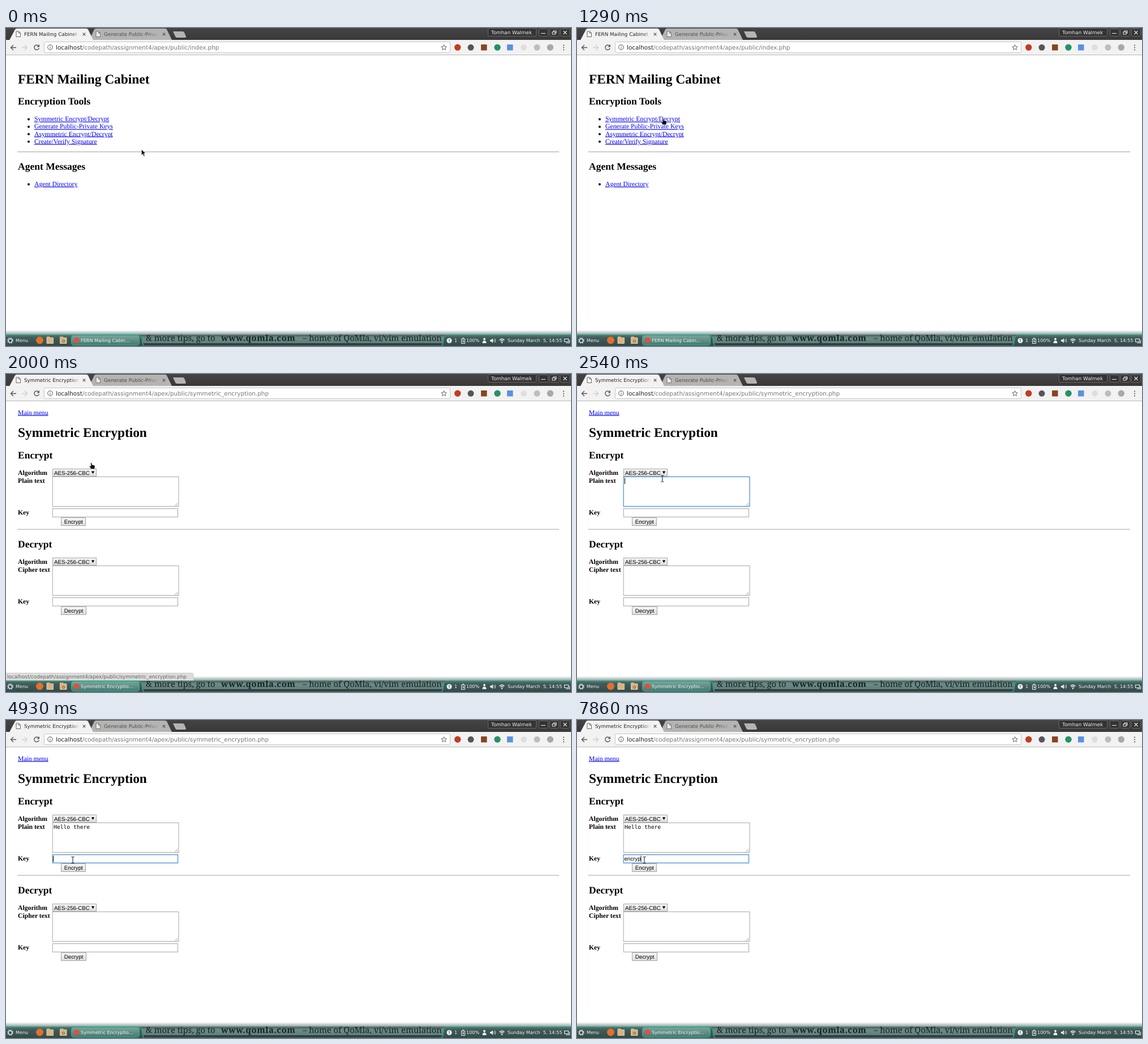
An HTML page that plays this animation: 998x561 px, repeating every 8 s.

```html
<!DOCTYPE html>
<html lang="en">
<head>
<meta charset="utf-8">
<title>Message tools</title>
<style>
html, body { margin: 0; width: 100%; height: 100%; overflow: hidden; background: #fff; }
svg { display: block; width: 100vw; height: 100vh; }
text { white-space: pre; text-rendering: geometricPrecision; }
.ui { font-family: "DejaVu Sans", sans-serif; font-size: 8.77px; fill: #222; }
.url { font-size: 10.41px; fill: #777; }
.panel { font-size: 8.1px; fill: #edf3f2; }
.page { font-family: "Liberation Serif", serif; font-size: 11.69px; }
.h1 { font-size: 23.38px; font-weight: bold; }
.h2 { font-size: 17.53px; font-weight: bold; }
.label { font-weight: bold; }
.link { fill: #00e; text-decoration: underline; }
.pressed .link:first-of-type { fill: #e00; }
.form { font-family: "Liberation Sans", Arial, sans-serif; font-size: 9.74px; }
.mono { font-family: "DejaVu Sans Mono", monospace; font-size: 9.7px; }
.wall { font-family: "Noto Serif", serif; font-size: 14.7px; fill: #14211f; }
.wall .site { font-weight: bold; letter-spacing: .6px; }
.field { fill: #fff; stroke: #a5a5a5; }
.field.on { stroke: #4b91dc; stroke-width: 1.3; }
.line { fill: none; stroke: #555; stroke-width: 1.4; }
.rule { stroke: #a2a2a2; }
</style>
</head>
<body>
<svg viewBox="0 0 998 561" preserveAspectRatio="none">
  <defs>
    <linearGradient id="title" x2="0" y2="1"><stop stop-color="#444"/><stop offset="1" stop-color="#383838"/></linearGradient>
    <linearGradient id="button" x2="0" y2="1"><stop stop-color="#f8f8f8"/><stop offset="1" stop-color="#dcdcdc"/></linearGradient>
    <linearGradient id="shade" x2="0" y2="1"><stop stop-color="#50706c" stop-opacity="0"/><stop offset="1" stop-color="#50706c" stop-opacity=".65"/></linearGradient>
    <linearGradient id="strip" x2="0" y2="1">
      <stop stop-color="#466460"/><stop offset=".3" stop-color="#6d8b87"/><stop offset=".7" stop-color="#617f7b"/><stop offset="1" stop-color="#35504c"/>
    </linearGradient>
    <linearGradient id="dock" x2="0" y2="1"><stop stop-color="#587572"/><stop offset=".25" stop-color="#405b59"/><stop offset="1" stop-color="#314a48"/></linearGradient>
    <linearGradient id="task" x2="0" y2="1"><stop stop-color="#7ba39b"/><stop offset="1" stop-color="#437a6e"/></linearGradient>
    <linearGradient id="fadeLight"><stop stop-color="#f2f2f2" stop-opacity="0"/><stop offset="1" stop-color="#f2f2f2"/></linearGradient>
    <linearGradient id="fadeGrey"><stop stop-color="#b4b4b3" stop-opacity="0"/><stop offset="1" stop-color="#b4b4b3"/></linearGradient>
    <clipPath id="clipTab"><rect x="30" width="99" height="22"/></clipPath>
    <clipPath id="clipOther"><rect x="170" width="99" height="22"/></clipPath>
    <clipPath id="clipStrip"><rect x="243" y="535" width="527" height="26"/></clipPath>
    <path id="sheet" d="M.5.5H5L8 3.500V10H.5ZM5 .5V3.500H8" fill="#fafafa" stroke="#555" stroke-width=".9"/>
    <path id="cross" d="M-2.300-2.300L2.300 2.300M2.300-2.300L-2.300 2.300" stroke="#555" stroke-width="1.200"/>
  </defs>

  <g id="home" class="page"></g>
  <g id="tool" class="page"></g>

  <g class="ui">
    <rect width="998" height="22" fill="url(#title)"/>
    <path d="M147 21L156 2.500Q157 1 159 1H281Q283 1 284 2.500L293 21Z" fill="#b4b4b3"/>
    <path d="M6 21.500L16 2.500Q17 1 19 1H142Q144 1 145 2.500L154 21.500Z" fill="#f2f2f2"/>
    <path d="M295 6H312Q314 6 315 8L318 15Q318 17 316 17H302Q300 17 299 15Z" fill="#b4b4b3"/>
    <use href="#sheet" x="17.500" y="5.500"/><use href="#sheet" x="158.500" y="5.500" opacity=".75"/>
    <text id="tabTitle" x="32" y="14" clip-path="url(#clipTab)"/>
    <rect x="115" y="4" width="15" height="14" fill="url(#fadeLight)"/>
    <text x="173" y="14" fill-opacity=".7" clip-path="url(#clipOther)">Generate Public-Private</text>
    <rect x="252" y="4" width="17" height="14" fill="url(#fadeGrey)"/>
    <use href="#cross" x="138" y="11"/><use href="#cross" x="279" y="11"/>
    <g fill="#333" stroke="#686868">
      <rect x="851.500" y=".5" width="85" height="14" rx="2"/>
      <rect x="941.500" y="1.500" width="16" height="13" rx="2"/><rect x="960.500" y="1.500" width="16" height="13" rx="2"/><rect x="979.500" y="1.500" width="16" height="13" rx="2"/>
    </g>
    <text x="893" y="11" text-anchor="middle" style="fill:#eee">Tomhan Walmek</text>
    <path d="M945 9.500H953M965 7H970V11H965ZM967 7V5H972V9H970M984.500 5L990.500 11M990.500 5L984.500 11" fill="none" stroke="#eee" stroke-width="1.100"/>

    <rect y="21" width="998" height="26.500" fill="#f2f2f2"/>
    <path d="M0 47.500H998" stroke="#b8b8b8"/>
    <rect x="67.500" y="24.500" width="717" height="19" rx="2" fill="#fff" stroke="#c6c6c6"/>
    <path class="line" d="M18 34.500H8.500M13 30L8.500 34.500L13 39"/>
    <path class="line" d="M28 34.500H37.500M33 30L37.500 34.500L33 39" opacity=".22"/>
    <path class="line" d="M57.500 31.500A4.300 4.300 0 1 0 58.300 35.500"/><path d="M59 29V33.500H54.500Z" fill="#555"/>
    <circle cx="78" cy="34" r="4.300" class="line" style="stroke-width:1"/><path d="M78 33.500V36.500M78 31.300V32.400" stroke="#555"/>
    <text class="url" x="88" y="38"><tspan fill="#222">localhost</tspan><tspan id="path"/></text>
    <path d="M773.500 29.500L774.800 32.700L778.300 33L775.600 35.200L776.500 38.600L773.500 36.700L770.500 38.600L771.400 35.200L768.700 33L772.200 32.700Z" class="line" style="stroke-width:.9"/>
    <circle cx="797.700" cy="34.300" r="5.700" fill="#c23b22"/>
    <circle cx="821" cy="34.300" r="5.500" fill="#55565a"/>
    <rect x="839" y="29" width="10.500" height="10.500" fill="#87451f"/>
    <circle cx="868" cy="34.300" r="5.700" fill="#249266"/>
    <rect x="885" y="29" width="10.500" height="10.500" fill="#5a91df"/>
    <circle cx="914.500" cy="34.300" r="5.300" fill="#dedede"/>
    <circle cx="938" cy="34.300" r="5.500" fill="#bdbdbd"/>
    <circle cx="961.300" cy="34.300" r="5.700" fill="#a8a8a8"/>
    <path d="M985 30.500h.01M985 34.500h.01M985 38.500h.01" stroke="#555" stroke-width="2.200" stroke-linecap="round"/>
  </g>

  <rect y="533" width="998" height="8" fill="url(#shade)"/>
  <g id="status" class="ui">
    <path d="M0 527.500H328Q331 527.500 331 530.500V541H0Z" fill="#dcdcdc" stroke="#c4c4c4" stroke-width=".7"/>
    <text x="2" y="537" style="fill:#68605a">localhost/codepath/assignment4/apex/public/symmetric_encryption.php</text>
  </g>

  <rect y="541" width="998" height="20" fill="url(#strip)"/>
  <g clip-path="url(#clipStrip)">
    <path d="M243 557.500H770" stroke="#0d1716" stroke-width="1.600"/>
    <g class="wall">
      <text x="247" y="552">&amp; more tips, go to</text>
      <text class="site" x="380" y="552">www.qomla.com</text>
      <text x="524" y="552">– home of QoMla, vi/vim emulation</text>
    </g>
  </g>
  <g fill="url(#dock)" stroke="#2c9c84" stroke-width="1.500">
    <path d="M-2 541.500H232Q240 542 240 550Q240 556 244 562H-2Z"/>
    <path d="M1000 541.500H780Q773 542 773 550Q773 556 769 562H1000Z"/>
  </g>
  <rect x="115.500" y="542.500" width="120" height="17" rx="4" fill="url(#task)" stroke="#38b598"/>
  <g class="ui panel">
    <circle cx="7.500" cy="551.500" r="3.200" fill="none" stroke="#edf3f2" stroke-width="1.300"/>
    <circle cx="7.500" cy="551.500" r="4.700" fill="none" stroke="#edf3f2" stroke-width="1.500" stroke-dasharray="1.600 2.090"/>
    <text x="17" y="554">Menu</text>
    <circle cx="59.500" cy="551" r="6.500" fill="#e2702b"/>
    <path id="folder" d="M72 546Q72 545 73 545H77L78.500 546.500H83.500V556.500H72Z" fill="#d9b381" stroke="#f2dfbd" stroke-width=".8"/>
    <use href="#folder" x="23.500"/><circle cx="101.500" cy="552.500" r="2" fill="none" stroke="#76512a"/>
    <circle cx="124.500" cy="551" r="5" fill="#dd5144"/>
    <text id="taskTitle" x="132" y="554"/>
    <circle cx="783" cy="551.500" r="4.500"/><path d="M783 548.800V552M783 553V554.200" stroke="#38524f" stroke-width="1.300"/>
    <text x="792" y="554">1</text>
    <path d="M804.500 548.500H810.500V556.500H804.500ZM806 547H809M808 550L806.500 552.500H809L807 555" fill="none" stroke="#edf3f2"/>
    <text x="813" y="554">100%</text>
    <circle cx="845" cy="548.800" r="2"/><path d="M841.500 556Q841.500 551.500 845 551.500T848.500 556Z"/>
    <path d="M855 550H857L860 547.500V555.500L857 553H855Z"/><path d="M861.500 549.500Q863 551.500 861.500 553.500M863.500 548Q866 551.500 863.500 555" fill="none" stroke="#edf3f2" stroke-width=".9"/>
    <path d="M871.500 550.500Q876 546.500 880.500 550.500M873.300 552.500Q876 550 878.700 552.500" fill="none" stroke="#edf3f2" stroke-width="1.200"/><circle cx="876" cy="554.800" r="1.300"/>
    <text x="886" y="554">Sunday March&#160; 5, 14:55</text>
    <path d="M986.500 548.500H993.500V553.500H986.500ZM989 555.500H995.500V550.500" fill="none" stroke="#edf3f2" stroke-width="1.100"/>
  </g>

  <g id="pointer">
    <path id="arrow" d="M0 0V10.600L2.400 8.300L4.200 12.400L5.900 11.600L4.200 7.600H7.300Z" fill="#111" stroke="#fff" stroke-width=".6"/>
    <path id="hand" d="M-1.800.3Q-1-.6 0 .3L.6 3.500L4.300 4.300Q5.800 4.700 5.700 6.200L5 10.800H-1L-4 6.500Q-4 5-2.500 5.600L-1.300 6.500Z" fill="#0c0c0c" stroke="#eee" stroke-width=".5"/>
    <path id="beam" d="M-2.500-5.500H-.7L0-5L.7-5.500H2.500M0-5V5M-2.500 5.500H-.7L0 5L.7 5.500H2.500" fill="none" stroke="#111"/>
  </g>
</svg>
<script>
const LOOP = 8000, STEP = 40;
const PRESS = 1840, PAGE_LOAD = 1920, TEXT_FOCUS = 2540, KEY_FOCUS = 4870;
const $ = id => document.getElementById(id);
const show = (el, on) => { el.style.display = on ? '' : 'none'; };
const clamp = p => Math.max(0, Math.min(1, p));
const text = (x, y, cls, str) => `<text x="${x}" y="${y}" class="${cls}">${str}</text>`;
const rule = y => `<path class="rule" d="M20 ${y}H977"/>`;
const item = (y, str) => `<g><circle cx="40" cy="${y - 3.2}" r="2"/>${text(50, y, 'link', str)}</g>`;

const form = (name, area, dy) => `<g transform="translate(0 ${dy})">
  ${text(21, 149, 'h2', name)}${text(21, 178, 'label', 'Algorithm')}
  ${text(21, 192, 'label', area)}${text(21, 248, 'label', 'Key')}
  <rect x="82.5" y="167.500" width="77" height="13" fill="url(#button)" stroke="#a5a5a5"/>
  ${text(85, 177.6, 'form', 'AES-256-CBC')}<path d="M150.800 171.500H156.200L153.500 176.300Z"/>
  <rect id="area${name}" class="field" x="82.2" y="181.300" width="222.800" height="52.200"/>
  <path d="M298.500 232.500L303.500 227.500M301.500 232.500L303.500 230.500" stroke="#888" stroke-width=".8"/>
  <rect id="key${name}" class="field" x="82.2" y="237.600" width="221.300" height="14.600"/>
  <rect x="97.5" y="253.500" width="${name === 'Encrypt' ? 43 : 44}" height="14" fill="url(#button)" stroke="#a5a5a5"/>
  ${text(102.8, 264, 'form', name)}</g>`;

$('home').innerHTML = text(21, 98, 'h1', 'FERN Mailing Cabinet') +
  text(21, 135, 'h2', 'Encryption Tools') +
  ['Symmetric Encrypt/Decrypt', 'Generate Public-Private Keys', 'Asymmetric Encrypt/Decrypt', 'Create/Verify Signature']
    .map((str, i) => item(164.2 + i * 13.15, str)).join('') +
  rule(218.5) + text(21, 250, 'h2', 'Agent Messages') + item(278.9, 'Agent Directory');
const firstLink = $('home').querySelector('g');

$('tool').innerHTML = text(21, 71.6, 'link', 'Main menu') + text(21, 111, 'h1', 'Symmetric Encryption') +
  form('Encrypt', 'Plain text', 0) + rule(274) + form('Decrypt', 'Cipher text', 157) +
  '<text id="plain" class="mono" x="84" y="192"/><text id="key" class="form" x="83.4" y="248.300"/>' +
  '<rect id="caret" width="1"/>';

const typing = {
  plain: { str: 'Hello there', at: [3250, 3360, 3460, 3600, 3730, 3890, 3970, 4050, 4140, 4220, 4300] },
  key: { str: 'encryp', at: [6550, 6860, 7070, 7320, 7500, 7860] }
};
const hidden = [[3150, 3250], [5520, 6100]];

// Pointer stops: time, x, y
const stops = [
  [770, 239.3, 214], [1290, 153, 160.7], [1450, 151.3, 156.6], [2120, 151.3, 156.6], [2440, 150.8, 184.5],
  [4440, 150.8, 184.5], [4640, 118, 247], [5680, 118, 247], [5720, 116, 247], [5790, 119, 247]
];

function pointerAt(t) {
  if (t < stops[0][0]) return stops[0].slice(1);
  const i = stops.findLastIndex(s => s[0] <= t);
  const a = stops[i], b = stops[i + 1];
  if (!b) return a.slice(1);
  const stepped = (Math.floor((t - a[0]) / STEP) + 1) * STEP;
  // Quick start, soft landing
  const p = clamp(stepped / (b[0] - a[0])) ** 0.8;
  const e = p * p * (3 - 2 * p);
  return [a[1] + (b[1] - a[1]) * e, a[2] + (b[2] - a[2]) * e];
}

function pointerKind(t, x, y) {
  if (t < PAGE_LOAD) return x < 189 && y > 154 && y < 207 ? 'hand' : 'arrow';
  if (t < 2120) return 'hand';
  return (y > 181 && y < 234) || (y > 237 && y < 253) ? 'beam' : 'arrow';
}

// The address bubble fades in on hover and out after the page has changed
const statusOpacity = t => clamp((t - 1540) / 120) * clamp((2440 - t) / 200) * (t >= 1580);

function draw(t) {
  const loaded = t >= PAGE_LOAD;
  show($('home'), !loaded);
  show($('tool'), loaded);
  firstLink.classList.toggle('pressed', t >= PRESS);
  $('tabTitle').textContent = loaded ? 'Symmetric Encryption' : 'FERN Mailing Cabinet';
  $('taskTitle').textContent = loaded ? 'Symmetric Encryptio...' : 'FERN Mailing Cabin...';
  $('path').textContent = '/codepath/assignment4/apex/public/' + (loaded ? 'symmetric_encryption' : 'index') + '.php';
  $('status').style.opacity = statusOpacity(t);

  for (const id in typing) {
    const { str, at } = typing[id];
    $(id).textContent = str.slice(0, at.filter(time => time <= t).length);
  }
  const inKey = t >= KEY_FOCUS, inText = t >= TEXT_FOCUS && !inKey;
  $('areaEncrypt').classList.toggle('on', inText);
  $('keyEncrypt').classList.toggle('on', inKey);

  const caret = $('caret'), active = $(inKey ? 'key' : 'plain');
  show(caret, (inText || inKey) && !hidden.some(([a, b]) => t >= a && t < b));
  const width = active.textContent && loaded ? active.getComputedTextLength() : 0;
  caret.setAttribute('x', (inKey ? 83.2 : 84) + width);
  caret.setAttribute('y', inKey ? 239.5 : 183.3);
  caret.setAttribute('height', inKey ? 11 : 10.7);

  const [x, y] = pointerAt(t), kind = pointerKind(t, x, y);
  $('pointer').setAttribute('transform', `translate(${x.toFixed(1)} ${y.toFixed(1)})`);
  for (const id of ['arrow', 'hand', 'beam']) show($(id), id === kind);
}

const start = performance.now();
function tick() {
  draw((performance.now() - start) % LOOP);
  requestAnimationFrame(tick);
}
tick();
</script>
</body>
</html>
```
